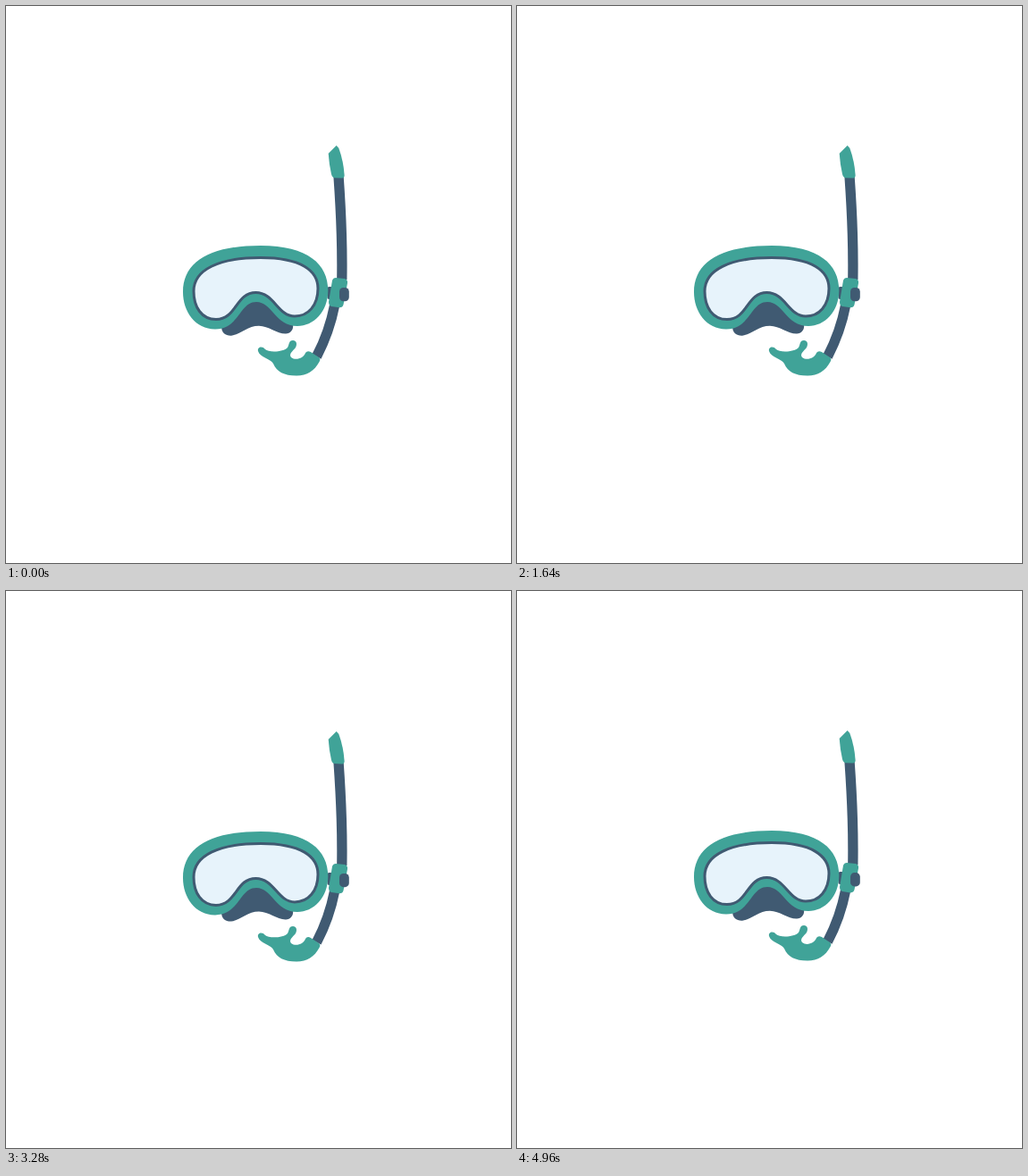
An HTML page that plays this animation: 565x623 px, repeating every 5 s.

```html
<!DOCTYPE html>
<html lang="en">
<head>
<meta charset="utf-8">
<title>Snorkel</title>
<style>
  html, body { margin: 0; width: 100%; height: 100%; overflow: hidden; background: #fff; }
  svg { display: block; width: 565px; height: 623px; }
  .teal { fill: #40a398; }
  .slate { fill: #405a72; }
  .tube { fill: none; stroke: #405a72; stroke-width: 11.3; }
  .lens { fill: #e7f3fb; stroke: #405a72; stroke-width: 3; }
</style>
</head>
<body>
<svg viewBox="0 0 565 623">
  <g id="gear">
    <!-- snorkel -->
    <path class="tube" d="M372 190C374.500 225 376.500 265 375.800 306"/>
    <path class="tube" d="M367.800 334C363.500 356 356.500 375 347.500 392"/>
    <path class="teal" d="M369.700 156L372.300 159Q377.500 173 378.600 189Q378.800 192.300 376 192.500L367.500 192.200Q365 192 364 188Q361.500 177 360.700 165Z"/>
    <rect class="slate" x="359.500" y="314" width="6" height="14" rx="2"/>
    <path class="teal" d="M369 304L379 305Q382.500 306 382 310L377.500 334Q376.500 337.500 373 337.300L364 336Q361 335 361 331L365 307Q366 304 369 304Z"/>
    <rect class="slate" x="373" y="315" width="10.800" height="15.300" rx="4.500"/>
    <path class="teal" d="M282 386C281 381 287 380 290 384C294 388 311 387 315 382C317 379 316 374 321 374C325 374 326 378 324 382C321 386 316 389 319 393C324 397 333 394 335 388Q337 385 341 387L350 393Q352.500 395 350.500 398C345 408 337 413.500 325 413.500C311 413.500 303 409 299 400C297 395 284 393 282 386Z"/>
    <!-- mask -->
    <path class="slate" d="M241 358C241 366 246 369 252 368.700C263 367.200 270 357.700 283 357.700C294 357.700 303 366.700 313 366.500C319 366 322 362 321 355L295 328H266Z"/>
    <path class="teal" d="M198 320C198 286 228 268 285 268C338 268 360.300 289 360.300 318C360.300 342 344 358 326 358C301 358 298 331 280 331C261 331 261 361.500 234 361.500C212 361.500 198 342 198 320Z"/>
    <path class="lens" d="M210 319C210 295 238 281.500 285 281.500C330 281.500 349 296 349 316C349 335 338 347 323 347C304 347 300 320.500 279.500 320.500C257 320.500 258 350.500 235 350.500C219 350.500 210 337 210 319Z"/>
  </g>
</svg>
<script>
  const LOOP = 5000, DEPTH = 13, FRAME = 40;
  const brisk = [1 / 4, 0, 2 / 3, 1];
  const smooth = [1 / 3, 0, 2 / 3, 1];
  // Alternating sinks and rises; the middle pair has sharper turns at the top.
  const eases = [brisk, brisk, [1 / 6, 1 / 6, 2 / 3, 1], [1 / 6, 0, 5 / 6, 5 / 6], smooth, smooth];
  const gear = document.getElementById('gear');

  const cubic = (a, b, s) => 3 * a * s * (1 - s) ** 2 + 3 * b * s * s * (1 - s) + s ** 3;

  function bezier([x1, y1, x2, y2], x) {
    let lo = 0, hi = 1;
    for (let i = 0; i < 20; i++) {
      const mid = (lo + hi) / 2;
      if (cubic(x1, x2, mid) < x) lo = mid; else hi = mid;
    }
    return cubic(y1, y2, lo);
  }

  function draw(now) {
    const time = Math.floor((now % LOOP) / FRAME) * FRAME;
    const phase = time / LOOP * eases.length;
    const leg = Math.floor(phase);
    const progress = bezier(eases[leg], phase - leg);
    const y = DEPTH * (leg % 2 ? 1 - progress : progress);
    gear.setAttribute('transform', `translate(0 ${y.toFixed(3)})`);
    requestAnimationFrame(draw);
  }
  draw(performance.now());
</script>
</body>
</html>
```
